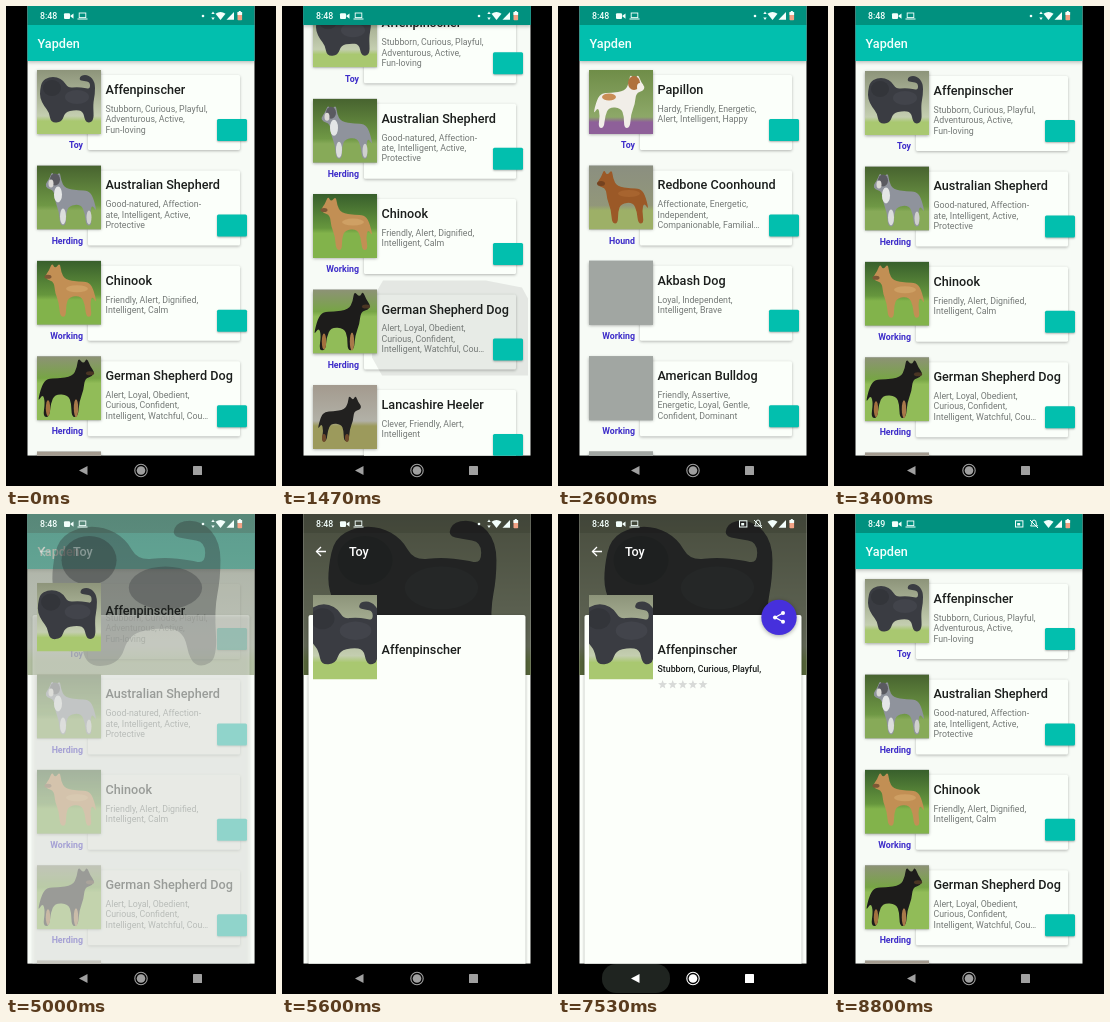
These frames come from a looping animation (270x480 px, 8870 ms). An HTML page with a canvas:

```html
<!DOCTYPE html>
<html lang="en">
<head>
<meta charset="utf-8">
<title>Dog breeds</title>
<style>
html, body { margin: 0; width: 100%; height: 100%; overflow: hidden; background: #000; }
canvas { display: block; width: 270px; height: 480px; }
</style>
</head>
<body>
<canvas id="stage"></canvas>
<script>
const LOOP = 8870, PITCH = 95.4, TOP = 65, BAR = 36;
const LEFT = 21.3, WIDTH = 227.4, HEIGHT = 449.7;
const canvas = document.getElementById('stage');
const c = canvas.getContext('2d');
const dpr = window.devicePixelRatio || 1;
canvas.width = 270 * dpr;
canvas.height = 480 * dpr;

const breeds = [
  ['Affenpinscher', 'Toy', ['Stubborn, Curious, Playful,', 'Adventurous, Active,', 'Fun-loving']],
  ['Australian Shepherd', 'Herding', ['Good-natured, Affection-', 'ate, Intelligent, Active,', 'Protective']],
  ['Chinook', 'Working', ['Friendly, Alert, Dignified,', 'Intelligent, Calm']],
  ['German Shepherd Dog', 'Herding', ['Alert, Loyal, Obedient,', 'Curious, Confident,', 'Intelligent, Watchful, Cou…']],
  ['Lancashire Heeler', 'Herding', ['Clever, Friendly, Alert,', 'Intelligent']],
  ['Papillon', 'Toy', ['Hardy, Friendly, Energetic,', 'Alert, Intelligent, Happy']],
  ['Redbone Coonhound', 'Hound', ['Affectionate, Energetic,', 'Independent,', 'Companionable, Familial…']],
  ['Akbash Dog', 'Working', ['Loyal, Independent,', 'Intelligent, Brave']],
  ['American Bulldog', 'Working', ['Friendly, Assertive,', 'Energetic, Loyal, Gentle,', 'Confident, Dominant']],
  ['Anatolian Shepherd', 'Working', ['Steady, Bold, Confident,', 'Independent, Proud']],
  ['Borzoi', 'Hound', ['Quiet, Respectful, Gentle,', 'Athletic, Independent']],
  ['Boxer', 'Working', ['Devoted, Fearless, Bright,', 'Playful, Energetic']]
];

// Silhouettes facing left, in photos 74.4 wide and 64 high, x running from -5.2
const shaggy = [[3,20],[5,11],[12,7],[20,7],[27,11],[31,18],[40,17],[48,18],[53,19],[53,12],[47,11],[42,10],[44,5],
  [52,5],[58,12],[58,24],[56,34],[57,50],[52,53],[48,51],[46,41],[38,40],[28,42],[25,52],[14,53],[12,42],[7,36],[3,28]];
const lean = [[8,17],[12,12],[15,4],[18,10],[23,4],[24,13],[28,21],[42,23],[51,23],[56,29],[60,45],[55,37],[53,45],
  [55,58],[49,58],[48,46],[44,37],[32,38],[29,46],[29,58],[23,58],[22,44],[18,34],[17,23],[10,21]];

// bg: sky, middle, ground; line: horizon; at: x, y, scale; spots: x, y, rx, ry, colour
const photos = [
  { bg: ['#8d947a', '#c4ceb0', '#a9c870'], line: 46, coat: '#3a3c42', shape: shaggy,
    spots: [[15,18,9,8,'#33353a'], [40,27,12,7,'#42444b']] },
  { bg: ['#47632f', '#6f9845', '#87aa58'], line: 40, coat: '#8f939c', shape: lean, at: [0,2,1],
    spots: [[21,29,4,8,'#e4e6e6'], [26,51,3,8,'#dcdedd'], [52,52,2.5,7,'#cfd0ce'], [18,14,5,6,'#5a5a60'], [14,18,2.5,4,'#dcdad6']] },
  { bg: ['#385f2c', '#66963d', '#82b34b'], line: 34, coat: '#c28f54', shape: lean, at: [0,-2,1],
    spots: [[40,28,11,3.5,'#cfa064'], [11,16,3.5,2,'#7d5735']] },
  { bg: ['#8d9276', '#77a545', '#91bc58'], line: 22, coat: '#1d1c1b', shape: lean, flip: 1, at: [-4,-3,1.1],
    spots: [[39,52,2.2,9,'#a8794a'], [11,52,2.2,8,'#a3713f'], [53,17,4,2,'#4a3523']] },
  { bg: ['#a39a8e', '#b2b1a7', '#9c9a5c'], line: 36, coat: '#222120', shape: lean, flip: 1, at: [1,7,.85],
    spots: [[34,53,2,4,'#6f4a2c'], [11,53,2,4,'#6f4a2c']] },
  { bg: ['#6f8d48', '#8da868', '#8e6099'], line: 47, coat: '#f1eee8', shape: lean, flip: 1, at: [0,0,1],
    spots: [[45,13,6,7,'#b0713c'], [51,17,3,4,'#f4efe8'], [20,27,7,3.5,'#c98d56']] },
  { bg: ['#8b8f80', '#92977a', '#9db067'], line: 40, coat: '#9b5927', shape: lean, at: [0,0,1],
    spots: [[40,28,11,3.5,'#a7642f'], [12,18,4,2.5,'#75421f']] }
];

const clamp = v => Math.max(0, Math.min(1, v));
const seg = (t, a, b) => clamp((t - a) / (b - a));
const smooth = p => p * p * (3 - 2 * p);
const mix = (a, b, p) => a + (b - a) * p;

function rect(x, y, w, h, fill, r = 0) {
  c.fillStyle = fill;
  c.beginPath();
  c.roundRect(x, y, w, h, r);
  c.fill();
}

function raised(x, y, w, h, fill, r, blur, dark) {
  c.save();
  c.shadowColor = `rgba(0,0,0,${dark})`;
  c.shadowBlur = blur * dpr;
  c.shadowOffsetY = dpr;
  rect(x, y, w, h, fill, r);
  c.restore();
}

function disc(x, y, rx, fill, ry = rx) {
  c.fillStyle = fill;
  c.beginPath();
  c.ellipse(x, y, rx, ry, 0, 0, 7);
  c.fill();
}

function poly(points, fill) {
  c.fillStyle = fill;
  c.beginPath();
  points.forEach(([x, y]) => c.lineTo(x, y));
  c.closePath();
  c.fill();
}

function line(points, color, w) {
  c.strokeStyle = color;
  c.lineWidth = w;
  c.beginPath();
  points.forEach(([x, y], i) => i ? c.lineTo(x, y) : c.moveTo(x, y));
  c.stroke();
}

function blob(points, fill) {
  const n = points.length;
  c.fillStyle = fill;
  c.beginPath();
  for (let i = 0; i <= n; i++) {
    const [x, y] = points[i % n], [u, v] = points[(i + 1) % n];
    if (i) c.quadraticCurveTo(x, y, (x + u) / 2, (y + v) / 2);
    else c.moveTo((x + u) / 2, (y + v) / 2);
  }
  c.fill();
}

function text(s, x, y, size, weight, color, align = 'left') {
  c.font = `${weight} ${size}px Roboto, sans-serif`;
  c.textAlign = align;
  c.fillStyle = color;
  c.fillText(s, x, y);
}

// Fills the box like object-fit: cover
function photo(i, x, y, w, h, alignY = .5) {
  const p = photos[i];
  if (!p) return rect(x, y, w, h, '#a1a6a2');
  const s = Math.max(w / 74.4, h / 64);
  c.save();
  c.beginPath();
  c.rect(x, y, w, h);
  c.clip();
  c.translate(x + (w - 64 * s) / 2, y + (h - 64 * s) * alignY);
  c.scale(s, s);
  const g = c.createLinearGradient(0, 0, 0, 64);
  g.addColorStop(0, p.bg[0]);
  g.addColorStop(p.line / 64, p.bg[1]);
  g.addColorStop(Math.min(1, p.line / 64 + .08), p.bg[2]);
  rect(-6, 0, 76, 64, g);
  const [dx, dy, k] = p.at || [0, 0, 1];
  c.save();
  c.translate(dx, dy);
  c.scale(k, k);
  if (p.flip) { c.translate(64, 0); c.scale(-1, 1); }
  blob(p.shape, p.coat);
  c.restore();
  p.spots.forEach(([sx, sy, rx, ry, col]) => disc(sx, sy, rx, col, ry));
  c.restore();
}

function row(i, y, ripple, shared) {
  const [name, group, traits] = breeds[i];
  raised(82, y + 5, 152, 75, '#fbfffa', 1.5, 3, .28);
  if (ripple) {
    c.globalAlpha = ripple;
    poly([[101, y - 9], [204, y - 9], [240, y - 2], [246, y + 9], [246, y + 86], [100, y + 86], [90, y + 68], [90, y + 10]], 'rgba(0,0,0,.08)');
    c.globalAlpha = 1;
  }
  if (!shared) {
    raised(31, y, 64, 64, '#a1a6a2', 0, 3, .35);
    photo(i, 31, y, 64, 64);
    text(name, 99.5, y + 24, 12.63, 500, '#1b1e1c');
  }
  traits.forEach((s, n) => text(s, 99.5, y + 41.8 + n * 10.4, 8.8, 400, '#747976'));
  text(group, 77, y + 78.2, 8.8, 700, '#3d2cc9', 'right');
  raised(211, y + 49, 30, 22, '#02bfae', 1.5, 2, .3);
}

function list(t, shared) {
  // The toolbar leaves before the list moves and returns with the first pull down
  const drag = 65 * Math.pow(seg(t, 1100, 1470), 1.5);
  const back = smooth(seg(t, 2150, 2550));
  const bar = Math.min(BAR, drag) * (1 - back);
  let offset = t < 3000 ? 1 + Math.max(0, drag - BAR) : 0;
  if (t > 1470) {
    const fling = 1 - Math.pow(1 - seg(t, 1470, 2100), 2);
    offset = mix(30, 560, fling);
    if (t > 2150) offset = mix(560, 478, smooth(seg(t, 2150, 2600)));
    if (t > 2600) offset = mix(478, 0, smooth(seg(t, 2600, 3340)));
  }
  rect(LEFT, 0, WIDTH, HEIGHT, '#f7fbf6');
  const held = seg(t, 1250, 1400) * (1 - seg(t, 1520, 1750));
  const tap = seg(t, 4680, 4780) * (1 - seg(t, 4820, 5000));
  breeds.forEach((b, i) => {
    const y = TOP + i * PITCH - offset - bar;
    if (y > -90 && y < 460) row(i, y, i == 3 ? held : i == 0 ? tap : 0, shared && i == 0);
  });
  raised(LEFT, 19 - bar, WIDTH, BAR, '#02bfae', 0, 4, .3);
  text('Yapden', 31.5, 41.5 - bar, 12.63, 500, '#f4fffc');
  rect(LEFT, 0, WIDTH, 19, '#01917f');
}

function star(x, y, r, fill) {
  poly(Array.from({ length: 10 }, (_, k) => {
    const a = k * Math.PI / 5 - Math.PI / 2, d = k % 2 ? r * .42 : r;
    return [x + d * Math.cos(a), y + d * Math.sin(a)];
  }), fill);
}

function fab(scale) {
  const nodes = [[4, -4.4], [-4, 0], [4, 4.4]];
  c.save();
  c.translate(221, 103.4);
  c.scale(scale, scale);
  raised(-17.7, -17.7, 35.4, 35.4, '#4630dc', 17.7, 4, .35);
  line(nodes, '#fff', 1.2);
  nodes.forEach(([x, y]) => disc(x, y, 2, '#fff'));
  c.restore();
}

function detail(open, extra) {
  c.save();
  c.globalAlpha = clamp(open * 1.6);
  rect(LEFT, 0, WIDTH, HEIGHT, '#fcfffa');
  photo(0, LEFT, 0, WIDTH, 161, .25);
  rect(LEFT, 0, WIDTH, 161, 'rgba(14,15,10,.54)');
  rect(LEFT, 0, WIDTH, 19, 'rgba(0,0,0,.1)');
  raised(26.5, 101, 217, 360, '#fcfffa', 2, 3, .35);
  line([[44, 37.5], [34.5, 37.5]], '#fff', 1.3);
  line([[39, 33], [34.5, 37.5], [39, 42]], '#fff', 1.3);
  text('Toy', 67, 42, 12.63, 500, '#fff');
  c.restore();

  photo(0, 31, mix(TOP, 81, open), 64, mix(64, 84.5, open));
  text('Affenpinscher', 99.5, mix(TOP + 24, 140, open), 12.63, 500, '#1b1e1c');
  if (extra > 0) {
    c.globalAlpha = extra;
    text('Stubborn, Curious, Playful,', 99.5, 158, 8.8, 500, '#1b1e1c');
    for (let i = 0; i < 5; i++) star(104.6 + i * 10.1, 170.7, 4.8, '#d8dad8');
    c.globalAlpha = 1;
    fab(extra);
  }
}

function status(t) {
  const ink = '#f3fffc';
  text(t < 8560 ? '8:48' : '8:49', 34, 13.4, 8.8, 500, ink);
  rect(58, 7.3, 6, 5.6, ink, 1);
  poly([[64, 10], [67.5, 7.5], [67.5, 12.7]], ink);
  c.strokeStyle = ink;
  c.lineWidth = .9;
  c.strokeRect(73.2, 7, 6.6, 4.6);
  line([[71.5, 13], [81.5, 13]], ink, 1);
  if (t < 6250) {
    disc(197, 10, 1.3, ink);
    poly([[207, 5.5], [208.7, 8], [205.3, 8]], ink);
    poly([[207, 14], [208.7, 11.5], [205.3, 11.5]], ink);
  } else {
    c.strokeStyle = ink;
    c.strokeRect(181.5, 6.8, 7.4, 6.2);
    rect(183.2, 9, 3, 2.6, ink);
    c.beginPath();
    c.moveTo(196.5, 12);
    c.quadraticCurveTo(198, 11, 197.8, 9);
    c.quadraticCurveTo(198, 6, 200, 6);
    c.quadraticCurveTo(202.2, 6, 202.2, 9);
    c.quadraticCurveTo(202, 11, 203.5, 12);
    c.closePath();
    c.stroke();
    line([[196, 6], [204, 14]], ink, 1);
  }
  poly([[209.5, 7.8], [212, 6.4], [214.5, 6], [217, 6.4], [219.5, 7.8], [214.5, 14]], ink);
  poly([[220.5, 13.8], [228, 13.8], [228, 6]], ink);
  rect(231.5, 6, 4.6, 8.2, '#f2a285', .8);
  rect(232.8, 5, 2, 1.4, ink);
  rect(231.5, 6, 4.6, 3, ink, .6);
}

function nav(t) {
  const press = seg(t, 7350, 7470) * (1 - seg(t, 7750, 8100));
  const lit = seg(t, 7300, 7400) * (1 - seg(t, 8100, 8400));
  const v = Math.round(mix(160, 255, lit)), ink = `rgb(${v},${v},${v})`;
  if (press) rect(44, 450, 68, 29, `rgba(31,36,32,${press})`, 14);
  poly([[73, 464.5], [81.5, 460], [81.5, 469]], ink);
  c.strokeStyle = ink;
  c.lineWidth = 1.1;
  c.beginPath();
  c.arc(135, 464.5, 6.2, 0, 7);
  c.stroke();
  disc(135, 464.5, 4.3, ink);
  rect(187, 460, 9, 9, ink, .6);
}

function draw(t) {
  c.setTransform(dpr, 0, 0, dpr, 0, 0);
  rect(0, 0, 270, 480, '#000');
  const open = smooth(seg(t, 4820, 5400)) * (1 - smooth(seg(t, 7640, 8250)));
  const extra = smooth(seg(t, 5660, 5960)) * (1 - smooth(seg(t, 7560, 7720)));
  c.save();
  c.beginPath();
  c.rect(LEFT, 0, WIDTH, HEIGHT);
  c.clip();
  if (open < 1) list(t, open > 0);
  if (open > 0) detail(open, extra);
  status(t);
  c.restore();
  nav(t);
}

const start = performance.now();
function tick() {
  draw((performance.now() - start) % LOOP);
  requestAnimationFrame(tick);
}
tick();
</script>
</body>
</html>
```
